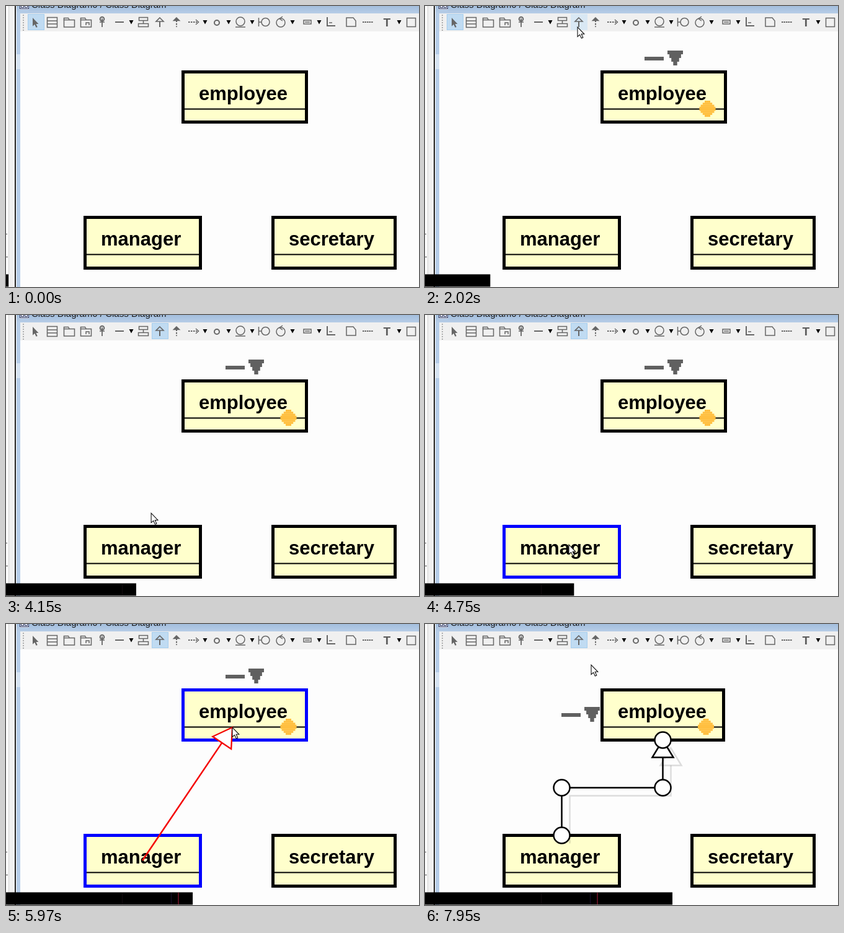
Animation of 666 by 454 pixels, one loop 8000 ms. Source, as an HTML page with a canvas:

```html
<!DOCTYPE html>
<html lang="en">
<head>
<meta charset="utf-8">
<title>Class diagram</title>
<style>
html, body { margin: 0; width: 100%; height: 100%; overflow: hidden; background: #fdfdfd; }
canvas { display: block; }
</style>
</head>
<body>
<canvas id="stage" width="666" height="454"></canvas>
<script>
const ctx = document.getElementById('stage').getContext('2d');
const LOOP = 8000;
const FONT = '"Liberation Sans", Arial, sans-serif';
const GREY = '#666';
const TIME = { press: 3420, armed: 3600, source: 4200, drag: 5060, drop: 6080, press2: 7420, rearm: 7530 };
const FLASH = 170;

// Pointer moves: each eases from the previous stop to its own
const START = { x: 562, y: 472 };
const MOVES = [
  { from: 100, to: 1740, x: 246, y: 34 },
  { from: 3600, to: 4330, x: 232, y: 371 },
  { from: 5070, to: 5830, x: 365, y: 167 },
  { from: 6100, to: 6700, x: 231, y: 57 },
  { from: 6850, to: 7150, x: 236, y: 34 },
  { from: 7540, to: 7880, x: 268, y: 66 }
];

function ease(t, from, to) {
  const k = Math.min(1, Math.max(0, (t - from) / (to - from)));
  return k * k * (3 - 2 * k);
}

function pointerAt(t) {
  let { x, y } = START;
  for (const m of MOVES) {
    const k = ease(t, m.from, m.to);
    x += (m.x - x) * k;
    y += (m.y - y) * k;
  }
  return { x, y };
}

function rect(x, y, w, h, color) {
  ctx.fillStyle = color;
  ctx.fillRect(x, y, w, h);
}

function frame(x, y, w, h, color = GREY, width = 1.5) {
  ctx.strokeStyle = color;
  ctx.lineWidth = width;
  ctx.strokeRect(x, y, w, h);
}

function trace(points) {
  ctx.beginPath();
  for (let i = 0; i < points.length; i += 2) ctx.lineTo(points[i], points[i + 1]);
}

function line(points, color = GREY, width = 1.5, dash = []) {
  trace(points);
  ctx.strokeStyle = color;
  ctx.lineWidth = width;
  ctx.setLineDash(dash);
  ctx.stroke();
  ctx.setLineDash([]);
}

const across = (x, y, w, width, dash) => line([x, y, x + w, y], GREY, width, dash);
const down = (x, y, h, width, dash) => line([x, y, x, y + h], GREY, width, dash);

function poly(points, fill, stroke, width = 1) {
  trace(points);
  ctx.closePath();
  if (fill) { ctx.fillStyle = fill; ctx.fill(); }
  if (stroke) { ctx.strokeStyle = stroke; ctx.lineWidth = width; ctx.stroke(); }
}

function circle(x, y, r, stroke = GREY, width = 1.5, fill) {
  ctx.beginPath();
  ctx.arc(x, y, r, 0, Math.PI * 2);
  if (fill) { ctx.fillStyle = fill; ctx.fill(); }
  if (stroke) { ctx.strokeStyle = stroke; ctx.lineWidth = width; ctx.stroke(); }
}

function text(str, x, y, font, color = '#000') {
  ctx.font = font + ' ' + FONT;
  ctx.fillStyle = color;
  ctx.fillText(str, x, y);
}

function arrowCursor(x, y, size, fill, stroke) {
  ctx.save();
  ctx.translate(x, y);
  ctx.scale(size, size);
  poly([0, 0, 0, 15.5, 3.6, 12.3, 6.3, 18, 8.8, 17, 6.2, 11.3, 10.8, 11.3], fill, stroke, 1.1);
  ctx.restore();
}

function drawWindow() {
  rect(0, 0, 666, 454, '#fdfdfd');
  rect(0, 0, 14, 454, '#f0f0f0');
  rect(0, 0, 4, 454, '#fbfbfb');
  rect(4, 0, 1, 454, '#d4d4d4');
  rect(0, 368, 2, 1, '#555');
  rect(0, 405, 3, 1, '#555');
  rect(14, 0, 2, 454, '#222');
  rect(17, 0, 6, 454, '#b6cde8');
  rect(17, 78, 6, 24, '#d6e3f2');
  const title = ctx.createLinearGradient(0, 0, 0, 12);
  title.addColorStop(0, '#a3bedd');
  title.addColorStop(1, '#b7cde7');
  rect(17, 0, 649, 12, title);
  rect(22, 0, 15, 6, '#eef2fa');
  frame(22.5, -3.5, 14, 8, '#27305c', 1);
  for (const x of [24.5, 30.5]) frame(x, -1.5, 4, 4, '#27305c', 1);
  text('Class Diagram0 / Class Diagram', 41, 3, '15px', '#1a1a1a');
  rect(23, 12, 643, 29, '#f0f0f0');
}

function button(x, selected) {
  rect(x, 13, 27, 26, selected ? '#c0dbf2' : '#d9e8f4');
  if (selected) frame(x + 0.5, 13.5, 26, 25, '#a5cdee', 1);
}

function folder(x) {
  frame(x, 22.5, 17, 11.5);
  line([x, 23, x, 19.5, x + 7, 19.5, x + 9, 23]);
}

function upArrow(x, half, fill, dash) {
  down(x, 19 + half, 15 - half, 2, dash);
  poly([x, 19, x + half, 19 + half, x - half, 19 + half], fill, GREY, 1.6);
}

function drawTools(t, pointer) {
  const armed = (t >= TIME.armed && t < TIME.drop) || t >= TIME.rearm;
  const pressed = armed || (t >= TIME.press && t < TIME.armed);
  const hover = pointer.y < 40 && pointer.x >= 235 && pointer.x < 262;
  if (!armed) button(35, true);
  if (pressed || hover) button(235, pressed);

  line([28, 14, 28, 40], '#b0b0b0', 2, [2, 2]);
  arrowCursor(43, 19, 0.88, GREY);

  // class, packages, pin, association
  frame(66.5, 18.5, 16, 16);
  for (const y of [24, 29]) across(67, y, 16);
  folder(93.5);
  folder(120.5);
  line([129, 31, 129, 27, 134, 27, 134, 31]);
  circle(155, 21, 3.3, GREY, 2);
  down(155, 20, 14, 1.8);
  across(151, 26, 8);
  across(176, 26, 14, 2);
  frame(214.5, 18.5, 14, 5);
  down(221.5, 23, 5);
  frame(213.5, 28.5, 16, 5);

  // generalization, realization, dependency
  upArrow(248, 6);
  upArrow(275, 4.5, GREY, [2.5, 2]);
  across(294, 26, 14, 2, [2.5, 1.5]);
  line([306, 22, 310.5, 26, 306, 30]);

  // interface, entity, boundary, control
  circle(340, 27, 4, GREY, 2);
  circle(378, 25, 7);
  across(370, 34, 16);
  down(407.5, 19, 14);
  across(408, 26, 4);
  circle(418.5, 26, 6.5);
  circle(443, 27, 7);
  line([446, 17, 441, 20.5, 446, 24]);

  // object, corner, note, anchor, text, box
  frame(480, 23, 12, 6);
  across(482, 26, 8);
  down(518, 18, 15, 2);
  across(518, 32, 13, 2);
  across(521, 27, 5);
  poly([549, 19, 560, 19, 564, 24, 564, 33, 549, 33], null, GREY, 1.5);
  across(575, 26, 17, 2, [2.5, 1]);
  text('T', 608.5, 33, 'bold 19px', '#5c5c5c');
  frame(646.5, 19.5, 14, 14);
  for (const x of [202, 321, 359, 397, 462, 505, 634]) poly([x - 3.5, 23, x + 3.5, 23, x, 29.5], '#000');
}

function classBox(name, x, y, w, h, active) {
  rect(x, y, w, h, '#ffffcc');
  rect(x + 4, y + 61.5, w - 8, 2, '#000');
  frame(x + 2.5, y + 2.5, w - 5, h - 5, active ? '#0000ff' : '#000', 5);
  text(name, x + 28, y + 48, 'bold 31px');
}

// Dash and coarse triangle, 62 wide
function hint(x, y) {
  rect(x, y + 10, 31, 6, '#606060');
  for (let i = 0; i < 4; i++) {
    const half = 12.5 - 3.1 * i;
    rect(x + 49.5 - half, y + i * 6, half * 2, 6, '#606060');
  }
}

function diamond(x, y) {
  for (let i = 0; i < 8; i++) {
    const half = Math.min(13, 4.5 + 3.2 * Math.min(i, 7 - i));
    rect(x - half, y - 13 + i * 3.25, half * 2, 3.4, '#ffbf40');
  }
}

const LINK = { left: 220.5, right: 383.5, top: 187.5, mid: 264.5, bottom: 341.5 };

function inheritance(shift, color, fill) {
  const { left, right, top, mid, bottom } = LINK;
  ctx.save();
  ctx.translate(shift, shift);
  line([left, bottom, left, mid, right, mid, right, top + 28], color, 2.5);
  poly([right, top, right + 17, top + 28, right - 17, top + 28], fill, color, 2.5);
  ctx.restore();
}

function drawLink() {
  const { left, right, top, mid, bottom } = LINK;
  inheritance(13, 'rgba(0,0,0,0.13)');
  inheritance(0, '#000', '#fff');
  for (const [x, y] of [[left, bottom], [left, mid], [right, mid], [right, top]]) {
    circle(x, y, 13, '#000', 2.5, '#fff');
  }
}

function drawDrag(tip) {
  const x = 220, y = 382, red = '#f40000';
  const len = Math.hypot(tip.x - x, tip.y - y);
  if (len < 32) return;
  const ux = (tip.x - x) / len, uy = (tip.y - y) / len;
  const bx = tip.x - ux * 30, by = tip.y - uy * 30;
  line([x, y, bx, by], red, 2.5);
  poly([tip.x, tip.y, bx - uy * 18, by + ux * 18, bx + uy * 18, by - ux * 18], '#fff', red, 2.3);
}

function drawDiagram(t, p) {
  const linked = t >= TIME.drop;
  const dragging = t >= TIME.drag && !linked;
  const over = dragging && p.y < 190 && p.x > 283;
  classBox('employee', 283, 104, linked ? 201 : 204, 86, over);
  classBox('manager', 125, 339, 191, 87, t >= TIME.source && !linked);
  classBox('secretary', 428, 339, 202, 87, false);
  if (linked) {
    hint(220, 134);
    diamond(453, 166);
    drawLink();
  } else if (t >= TIME.press || p.y < 190) {
    hint(354, 72);
    diamond(455.5, 166);
  } else if (p.y < 426) {
    hint(498, 307);
    diamond(598, 401.5);
  }
  if (dragging) drawDrag(p);
}

function drawClick(t, { x, y }) {
  const lit = [TIME.press, TIME.drag, TIME.press2].some(at => t >= at - 20 && t < at - 20 + FLASH);
  if (lit) circle(x - 1, y, 15, null, 0, 'rgba(235,230,30,0.72)');
}

function drawProgress(t) {
  const w = 4 + 3.376 * Math.floor(t / 67.8 + 0.25);
  rect(0, 433.5, w, 20, '#000');
  if (w > 190) rect(187, 434, 1, 19, '#140a10');
  if (w > 282) {
    rect(266, 434, 1, 19, '#1a1030');
    rect(277, 434, 2, 19, '#5a1020');
  }
}

function render(now) {
  const t = now % LOOP;
  const p = pointerAt(t);
  drawWindow();
  drawTools(t, p);
  drawDiagram(t, p);
  arrowCursor(p.x, p.y, 1, '#fff', '#111');
  drawClick(t, p);
  drawProgress(t);
}

const start = performance.now();
function tick() {
  render(performance.now() - start);
  requestAnimationFrame(tick);
}
tick();
</script>
</body>
</html>
```
